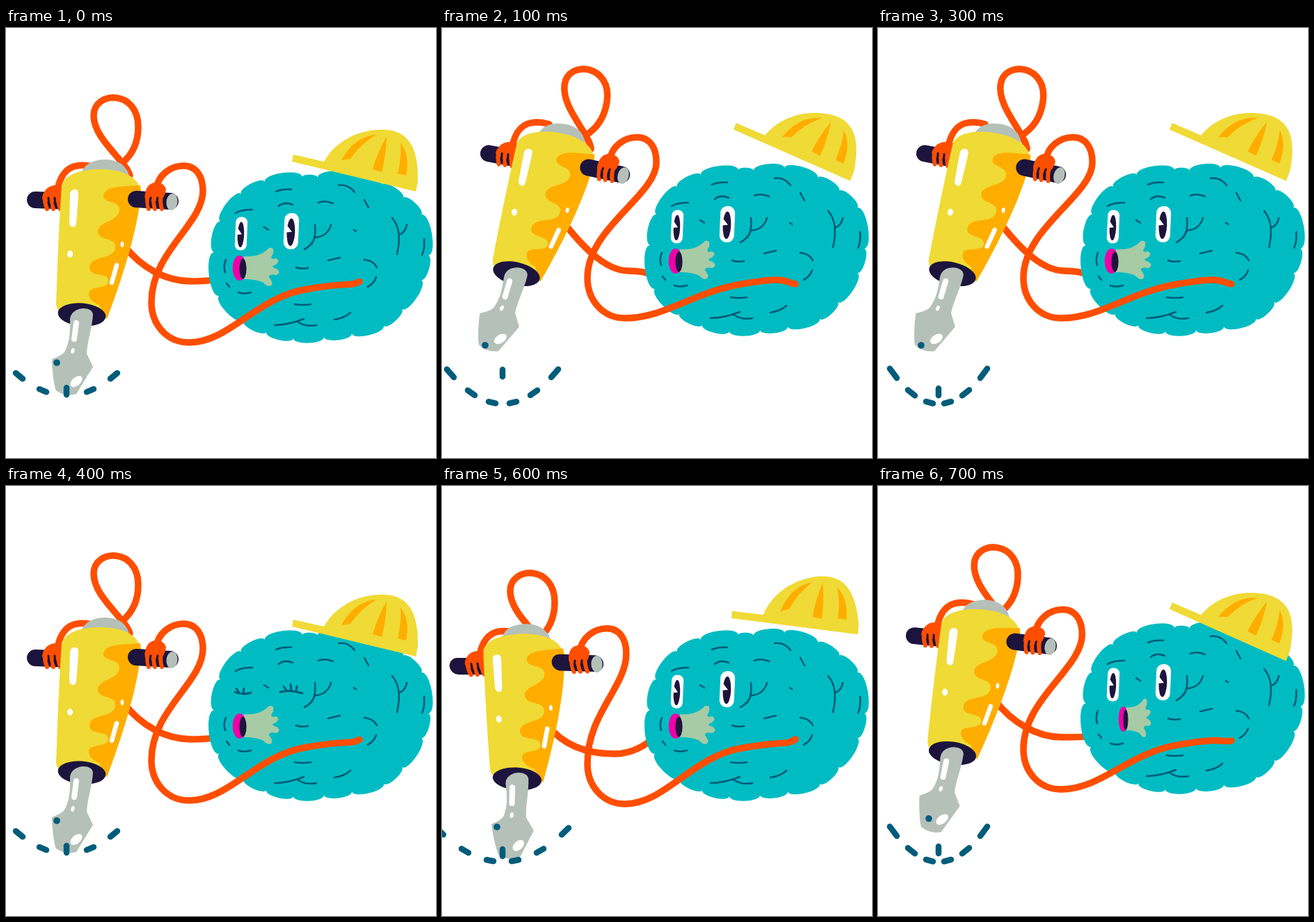
Animation of 618x618 px, one loop 800 ms. Source, as an HTML page with a canvas:

```html
<!DOCTYPE html>
<html lang="en">
<head>
<meta charset="utf-8">
<title>Drilling brain</title>
<style>
html, body { margin: 0; width: 100%; height: 100%; overflow: hidden; background: #fff; }
canvas { display: block; width: 100vw; height: 100vh; }
</style>
</head>
<body>
<canvas id="stage" width="618" height="618"></canvas>
<script>
const ctx = document.getElementById('stage').getContext('2d');
const YELLOW = '#f0da35', AMBER = '#ffae00', NAVY = '#1c143c', GREY = '#b5c0b9',
      ORANGE = '#ff4e00', TEAL = '#00bcc2', INK = '#005c7a', PINK = '#f000a8',
      GREEN = '#a7cba4', WHITE = '#fff';

// drill: left handle end, right handle end, collar centre
// hat, loop: anchor point and turn in degrees
// cord: start point and lowest height; sag: lowest height of the front arm
// burst: first ray, spread, ground height; spot: chip on the bit; hop: height of the middle chip
const rest = {
  drill: [40, 247, 238, 250, 108, 412], lift: 0, hat: [411, 192, 0], mouth: 1,
  loop: [152, 100, 0], cord: [170, 313, 364], sag: 452,
  burst: [1, 34, 528], spot: [73, 481], hop: 522
};
const down = {
  drill: [21, 259, 222, 256, 107, 421], lift: 0, hat: [416, 190, -6.3], mouth: 1,
  loop: [124, 125, 0], cord: [152, 344, 385], sag: 457,
  burst: [0.5, 36, 540], spot: [79, 490], hop: 527
};
const up = {
  drill: [65, 180, 260, 212, 106, 353], lift: -10, hat: [419, 146, 10.2], mouth: 1,
  loop: [206, 59, 9], cord: [172, 276, 349], sag: 417,
  burst: [0.5, 30, 540], spot: [62, 456], hop: 496
};
const half = {
  drill: [50, 215, 247, 231, 106, 384], lift: -10, hat: [419, 177, 10.4], mouth: 0.7,
  loop: [166, 88, 4], cord: [168, 308, 361], sag: 436,
  burst: [0.5, 26, 540], spot: [73, 478], hop: 523
};
const steps = [
  rest, up, down, { ...up, burst: half.burst, hop: half.hop },
  { ...rest, hat: [411, 202, 0], blink: true }, up, down, half
];

const fill = (d, color) => { ctx.fillStyle = color; ctx.fill(new Path2D(d)); };
function stroke(d, color, width) {
  ctx.strokeStyle = color;
  ctx.lineWidth = width;
  ctx.stroke(new Path2D(d));
}
const rope = d => stroke(d, ORANGE, 9.5);
function oval(x, y, rx, ry, color, turn = 0) {
  ctx.fillStyle = color;
  ctx.beginPath();
  ctx.ellipse(x, y, rx, ry, turn, 0, 2 * Math.PI);
  ctx.fill();
}
function within(change, draw) {
  ctx.save();
  change();
  draw();
  ctx.restore();
}
const placed = ([x, y, turn], draw) => within(() => {
  ctx.translate(x, y);
  ctx.rotate(turn * Math.PI / 180);
}, draw);

const basis = ([lx, ly, rx, ry, x, y]) => new DOMMatrix([lx - x, ly - y, rx - x, ry - y, x, y]);
const drillMatrix = pose => basis(pose.drill).multiply(basis(rest.drill).inverse());
const onDrill = (pose, x, y) => drillMatrix(pose).transformPoint({ x, y });
const inDrill = (pose, draw) => within(() => {
  const m = drillMatrix(pose);
  ctx.transform(m.a, m.b, m.c, m.d, m.e, m.f);
}, draw);

function backRopes(pose) {
  const [x, y, low] = pose.cord;
  rope(`M${x} ${y}C${x + 25} ${y + 32} ${x + 60} ${low} ${x + 96} ${low}S305 360 312 357`);
  const { x: gx, y: gy } = onDrill(pose, 74, 232);
  rope(`M${gx} ${gy}c4 -20 14 -32 28 -34q12 -2 25 2`);
  placed(pose.loop, () => rope('M26 112C20 90 -26 60 -26 26C-26 -10 38 -12 38 42C38 65 30 82 14 95'));
}

function frontArm(pose) {
  const { x, y } = onDrill(pose, 216, 232), { sag } = pose, slack = sag - 417;
  const mid = 368 + slack * 0.22, end = 368 - slack * 0.1;
  rope(`M${x} ${y}c2 -20 20 -34 39 -34s28 16 28 36C${x + 67} ${y + 50} 209 ${sag - 130} 209 ${sag - 58}` +
    `C209 ${sag - 25} 232 ${sag} 263 ${sag}C320 ${sag} 360 ${mid + 12} 430 ${mid}S490 ${mid - 3} 508 ${end}`);
}

function leftGrip() {
  stroke('M42 247L92 249', NAVY, 24);
  fill('M53 240Q58 226 72 226L84 226V250H56Q50 246 53 240Z', ORANGE);
  for (const x of [56, 65, 75]) stroke(`M${x} 240q-1 11 3 20`, ORANGE, 6);
  for (const x of [61, 70]) stroke(`M${x} 244q0 7 2 12`, NAVY, 3);
}

function rightGrip() {
  stroke('M187 246L236 249', NAVY, 24);
  oval(238.5, 250, 8, 12, GREY, 0.1);
  fill('M200 238Q202 224 214 222Q228 222 230 232Q228 244 222 248L202 250Q198 244 200 238Z', ORANGE);
  for (const x of [204, 213, 223]) stroke(`M${x} 239q-2 12 1 21`, ORANGE, 6);
  for (const x of [208, 218]) stroke(`M${x} 244q-2 7 0 13`, NAVY, 3);
}

function drillBody() {
  fill('M107 212Q112 190 142 189Q170 189 177 212Z', GREY);
  fill('M80 226C84 212 105 203 135 203C165 203 190 212 194 235C190 290 165 365 145 418L74 405L72 398C74 330 77 270 80 226Z', YELLOW);
  fill('M193 226C170 228 142 226 140 241C140 253 164 247 163 262C162 278 131 278 132 293C133 307 160 300 157 316C155 334 121 326 120 344C119 359 148 350 147 364C146 376 120 370 119 381C119 389 124 394 134 398L145 418C165 365 190 290 194 235Z', AMBER);
  fill('M92 240Q92 232 99 232Q105 232 104 241L101 281Q100 286 96 286Q91 285 91 279Z', WHITE);
  oval(92, 325, 4, 5, WHITE);
  oval(167, 311, 2.4, 4, WHITE);
  stroke('M159 341L152 366', WHITE, 6.5);
  oval(109, 412, 34.5, 16.5, NAVY, 0.09);
  fill('M92 420C92 400 124 398 125 412C124 430 117 450 116 468L125 487L101 526Q85 530 72 521C69 515 66 490 66 476Q82 470 85 464C92 448 92 440 92 420Z', GREY);
  stroke('M101 424L98 447', WHITE, 8);
  oval(96, 464, 2.6, 4, WHITE, 0.3);
  oval(101, 508, 10, 6, WHITE, -0.7);
}

// Corners between the bumps; every side swells outward by the same share of its length
const corners = [[448,215], [492,211], [540,225], [571,244], [597,268], [607,327], [597,362],
  [569,404], [543,428], [497,439], [457,444], [413,446], [374,437], [341,421], [306,385],
  [299,322], [308,278], [338,238], [372,221], [426,214]];
const outline = 'M448 215' + corners.map(([x, y], i) => {
  const [u, v] = corners[(i + 1) % corners.length];
  const bx = (v - y) * 0.23, by = (x - u) * 0.23;
  return `C${x + bx} ${y + by} ${u + bx} ${v + by} ${u} ${v}`;
}).join('');
const folds = 'M388 235Q398 231 410 232M330 266Q337 261 354 261M392 256Q400 249 412 254M449 251Q458 247 470 252' +
  'M478 226Q492 224 501 236M515 247L521 258M371 286L377 290M500 290L503 292M444 283Q446 300 439 311' +
  'M467 283Q462 300 444 301Q440 312 429 318M555 273Q570 290 562 325M576 283Q574 294 565 297' +
  'M601 303Q602 318 598 326M316 333Q312 342 315 351M463 334L480 330M515 333Q528 334 533 344' +
  'M532 358Q529 367 520 372M417 344Q424 347 434 345M317 367L321 372M334 380Q342 383 352 380' +
  'M415 397Q427 399 438 397M386 427Q405 427 428 418M419 422Q430 430 446 427M472 419Q486 417 495 409';

function eye(x, y, w, h) {
  placed([x, y, 2.5], () => {
    ctx.fillStyle = WHITE;
    ctx.beginPath();
    ctx.roundRect(-w / 2, -h / 2, w, h, w * 0.46);
    ctx.fill();
    oval(-0.5, 1.5, w * 0.28, h * 0.38, NAVY);
    fill(`M1 1L${-w * 0.4} ${-h * 0.2}V2Z`, WHITE);
  });
}

function brain(pose) {
  fill(outline, TEAL);
  stroke(folds, INK, 2.6);
  if (pose.blink) {
    stroke('M329 296Q340 301 352 297M335 297L331 291M341 298L342 291M394 296Q410 292 426 298M403 294L399 288M410 294L409 285M417 295L418 288', INK, 3);
  } else {
    eye(338, 295.5, 17, 48);
    eye(410, 292, 21, 52);
  }
  within(() => { ctx.translate(392 * (1 - pose.mouth), 0); ctx.scale(pose.mouth, 1); }, () => {
    fill('M342 328Q365 330 378 316Q386 314 384 324Q377 334 388 331Q395 334 388 340Q378 343 389 346Q396 351 389 355Q377 353 378 358Q385 367 381 370Q376 373 370 366Q360 361 342 361Z', GREEN);
    oval(335.5, 345, 9.8, 18, PINK);
    oval(340.5, 346, 5, 14.5, NAVY);
  });
}

function hat() {
  ctx.translate(-411, -192);
  fill('M413 182L457 192C475 160 510 146 540 146C576 146 593 168 592 220L589 235L411 192Z', YELLOW);
  fill('M482 190Q500 156 533 153Q510 166 495 188ZM547 156Q534 178 527 203L540 207Q546 185 547 156ZM567 165Q581 182 575 212L563 209Q569 185 567 165Z', AMBER);
}

// Chips fly out along a parabola on both sides of the bit
function chips({ burst: [first, spread, ground], spot, hop }) {
  for (let k = first; k < 3; k++) {
    for (const side of [-1, 1]) {
      const x = 87 + side * k * spread, y = ground - 7 * k * k;
      const dx = 5 * side, dy = -70 * k / spread;
      stroke(`M${x - dx} ${y - dy}L${x + dx} ${y + dy}`, INK, 8.5);
    }
  }
  stroke(`M87 ${hop - 5}V${hop + 5}`, INK, 8.5);
  oval(...spot, 4.8, 4.8, INK);
}

function draw(now) {
  const pose = steps[Math.floor(now / 100) % steps.length];
  ctx.fillStyle = WHITE;
  ctx.fillRect(0, 0, 618, 618);
  ctx.lineCap = ctx.lineJoin = 'round';
  backRopes(pose);
  inDrill(pose, leftGrip);
  inDrill(pose, drillBody);
  within(() => ctx.translate(0, pose.lift), () => brain(pose));
  placed(pose.hat, hat);
  frontArm(pose);
  inDrill(pose, rightGrip);
  chips(pose);
}

const start = performance.now();
function tick() {
  draw(performance.now() - start);
  requestAnimationFrame(tick);
}
tick();
</script>
</body>
</html>
```
